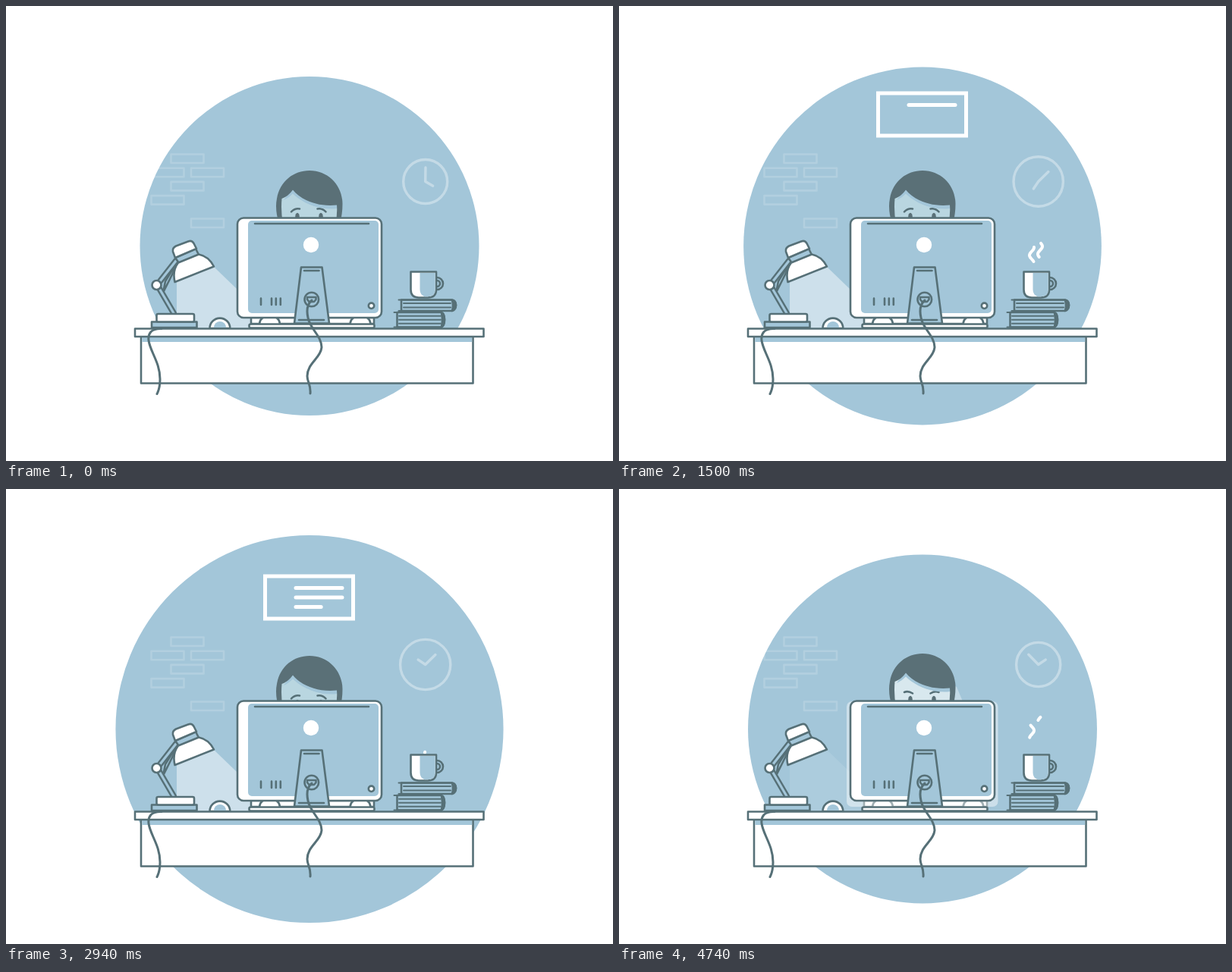
An HTML page that plays this animation: 800x600 px, repeating every 4.77 s.

```html
<!DOCTYPE html>
<html lang="en">
<head>
<meta charset="utf-8">
<title>Working at the desk</title>
<style>
  html, body { margin: 0; width: 100%; height: 100%; overflow: hidden; background: #fff; }
  svg { display: block; width: 100vw; height: 100vh; }
  .line { fill: none; stroke: #567077; stroke-width: 2.6; stroke-linecap: round; stroke-linejoin: round; }
  .white { fill: #fff; }
  .blue { fill: #a3c6d9; }
  .dark { fill: #5a7077; }
  .chalk { fill: none; stroke: #fff; stroke-linecap: round; stroke-linejoin: round; }
  .thin { stroke-width: 2; }
  .cable { stroke-width: 3; }
  .rod { stroke-width: 8; }
  .core { stroke: #a3c6d9; stroke-width: 3.2; }
</style>
</head>
<body>
<svg viewBox="0 0 800 600">
  <circle id="room" class="blue" cx="400" cy="316.5"/>
  <path id="bricks" class="chalk" stroke-width="2.6" opacity=".16"/>
  <g class="chalk" stroke-width="3.4" opacity=".36">
    <circle id="clock" cx="552.7" cy="231.5"/>
    <path id="hands"/>
  </g>

  <g id="board" class="chalk" stroke-width="5">
    <path stroke-linejoin="miter" d="M341.5 115h116v56h-116z"/>
    <path id="text"/>
    <path id="pill" stroke-width="7" d="M356 134.5h11.5"/>
    <circle id="alert" cx="474" cy="110" fill="#c1272d" stroke="none"/>
  </g>

  <path id="steam" class="chalk" stroke-width="4"/>
  <path id="beam" class="white" d="M225 364L274 344L358 425H225z"/>
  <path id="ray" class="white" d="M440 258L445 261L453 280H440z"/>

  <g id="head">
    <path fill="#b9d6e0" d="M362 244H437V300H362z"/>
    <path id="faceLight" class="white" d="M362 244H437V300H362z"/>
    <path id="brows" class="line"/>
    <g id="eyes" class="dark">
      <ellipse cx="384" cy="278" rx="2.8" ry="5.2"/>
      <ellipse cx="415" cy="278" rx="2.8" ry="5.2"/>
    </g>
    <path class="blue" d="M371 249L378 240L437 255V267C413 270 391 260 378 247.5Q373 253 366 256z"/>
    <path class="dark" d="M360 288Q354 268 357 254C361 231 379 217 400 217C425 217 443.5 237 443.5 261Q443.5 274 440 288H434Q437 275 436 262.5C412 265 390 257 378 242.5Q372 251 363.5 254Q362 270 365 288z"/>
  </g>

  <path class="line white" d="M323 411H485V419H323z"/>
  <path class="line white" d="M334 419Q335 409 347.5 409T361 419M453.5 419Q454.5 409 467 409T480.5 419"/>
  <rect id="glow" class="white" x="300" y="280" width="199.5" height="139" rx="7"/>

  <rect class="white" x="305" y="279.5" width="190" height="131.5" rx="8"/>
  <rect class="blue" x="319" y="283" width="172" height="122" rx="5"/>
  <rect class="line" x="305" y="279.5" width="190" height="131.5" rx="8"/>
  <path class="line" d="M328 287H478M336 385.5v8.5M350 385.5v8.5M355.8 385.5v8.5M361.8 385.5v8.5"/>
  <circle class="white" cx="402" cy="315" r="10.2"/>
  <circle class="line white" cx="481.5" cy="395.3" r="3.7"/>
  <rect class="line white" x="320.5" y="419.5" width="165" height="5" rx="2"/>
  <path class="line blue" d="M389 344.5H416.5L426 418.5H380z"/>
  <path class="line" d="M393 349H412.5M386 414H419"/>
  <circle class="line" cx="402.8" cy="387" r="9.3"/>
  <path class="line" d="M397 384H408.5V387L406 390H399.5L397 387z"/>

  <g class="line">
    <path d="M207 378L210 363L221 345M207 378L222 348"/>
    <path class="rod" d="M200 369L221 405M199 368L224 336"/>
    <path class="core" d="M200 369L221 405M199 368L224 336"/>
    <circle class="white" cx="198.5" cy="368" r="6"/>
    <path class="blue" d="M223 332L250 320L254 328L228 339z"/>
    <path class="white" d="M223 332L220 324Q219 319 224 316.5L240 310.5Q245 308.5 247.5 313L251 320z"/>
    <path class="white" d="M222.5 364Q219 349 227 338.5L254 327.5Q267 330 274 343.5z"/>
    <path class="blue" d="M192 416.5H251.5V424H192z"/>
    <rect class="white" x="198.5" y="406" width="49.5" height="10.5" rx="2"/>
    <path class="white" d="M268.5 425A13.4 13.4 0 0 1 295.3 425z"/>
  </g>
  <path class="blue" d="M274 424A8 8 0 0 1 290 424z"/>

  <g class="line">
    <path class="blue" d="M521 387.5H588Q593 388 593 394.5T588 402H521z"/>
    <path class="thin" d="M517.5 387.5H588M517.5 402H588M524 392H586M524 397.5H586"/>
    <path class="dark" d="M588 388Q593 390 593 394.5T588 402Q590 395 588 388z"/>
    <path class="blue" d="M515.5 404H574Q578 405 578 413.5T574 423.5H515.5z"/>
    <path class="thin" d="M511.5 404H574M511.5 423.5H574M518 408.7H573M518 413.7H573M518 418.7H573"/>
    <path class="dark" d="M574 404.5Q578 407 578 413.5T574 423Q576 414 574 404.5z"/>
    <circle class="blue" cx="568" cy="366" r="8"/>
    <circle class="blue" cx="568" cy="366" r="4"/>
    <path class="white" d="M533.5 350.5H567V374Q567 384.5 556 384.5H544Q533.5 384.5 533.5 374z"/>
  </g>
  <path class="blue" d="M545.5 352H565.7V374Q565.7 383.2 556 383.2H552Q545.5 381 545.5 374z"/>

  <path class="line white" d="M178 436H615.5V497.5H178z"/>
  <path class="blue" d="M179.3 437H614.2V443H179.3z"/>
  <path class="line white" d="M170 425.5H629.5V436H170z"/>
  <path class="line cable" d="M205 425.5C191 425 187 432 188 441C190 456 203 470 203 492Q203 504 199 511.5"/>
  <path class="line cable" d="M403 388C396 394 396 402 398 411C400 425 416 435 416 450C415 464 397 471 397 488C397 496 402 499 401 511"/>
</svg>

<script>
const LOOP = 4770;
const STEAM_LOOP = 2850;
const el = {};
for (const node of document.querySelectorAll("[id]")) el[node.id] = node;

const set = (id, name, value) => el[id].setAttribute(name, value);
const ramp = (t, start, length) => Math.min(1, Math.max(0, (t - start) / length));
const easeOut = p => 1 - (1 - p) ** 2;
// Smooth bump around a centre time.
const pulse = (t, center, reach) => (1 + Math.cos(Math.PI * ramp(Math.abs(t - center), 0, reach))) / 2;
// Fades in from start and out towards end.
const plateau = (t, start, end, fade) => Math.min(ramp(t, start, fade), ramp(end - t, 0, fade));

// Brick positions as x and row.
set("bricks", "d", [[217.5, 0], [191.5, 1], [244, 1], [217.5, 2], [191.5, 3], [244, 4.67]]
  .map(([x, row]) => `M${x} ${195.5 + 18.2 * row}h43v11.5h-43z`).join(""));

function hand(degrees, length) {
  const a = degrees * Math.PI / 180;
  return `${552.7 + length * Math.sin(a)} ${231.5 - length * Math.cos(a)}`;
}

function drawRoom(t) {
  const peak = 2860;
  set("room", "r", t < peak ? 223.5 + 33.2 * (t / peak) ** 1.53 : 256.7 - 0.0142 * (t - peak));
  set("clock", "r", 29 + 4.4 * Math.sin(Math.PI * t / LOOP));
  set("hands", "d", `M${hand(t * 0.75, 18.5)}L552.7 231.5L${hand(120 + t / 16, 11.5)}`);
  const dim = ramp(t, 4560, 180);
  set("beam", "opacity", 0.45 - 0.35 * dim);
  set("ray", "opacity", 0.35 * dim);
}

function drawBoard(t) {
  const slide = -300 * (1 - easeOut(ramp(t, 600, 522)));
  const tilt = 1.5 * Math.sin(3 * Math.PI * ramp(t, 4080, 360));
  const size = ramp(t, 500, 100) - ramp(t, 4450, 200);
  set("board", "transform", `translate(${399.5 + slide} 143) rotate(${tilt}) scale(${size}) translate(-399.5 -143)`);
  let lines = "";
  for (let i = 0; i < 3; i++) {
    const typed = ramp(t, 825 + 956 * i, 375);
    if (typed) lines += `M382 ${130.5 + 12.5 * i}h${61 * typed}`;
  }
  set("text", "d", lines);
  set("pill", "opacity", t > 3900 ? 1 : 0);
  set("alert", "r", 5.2 * ramp(t, 4100, 130));
}

// A wave that grows from the cup, rests, then leaves from its lower end.
function wisp(u, x, crest, rise, duration, leave) {
  const gone = ramp(u, leave, 600);
  const top = 350 - 35 * easeOut(ramp(u, rise, duration)) - 18 * gone;
  const bottom = 350 - 13 * easeOut(ramp(u, rise, duration * 0.65)) - 40 * gone;
  if (bottom - top < 0.3) return "";
  const points = [];
  for (let y = bottom; y > top; y--) {
    points.push(`${x + 3 * Math.cos((y - crest) / 10.3 * Math.PI)} ${y}`);
  }
  return `M${points.join("L")}l0 0`;
}

function drawSteam(t) {
  const u = t % STEAM_LOOP;
  set("steam", "d", wisp(u, 544, 339, 480, 1400, 1750) + wisp(u, 555, 337.5, 30, 1050, 1410));
}

function drawPerson(t) {
  const glow = plateau(t, 980, 1400, 130) + plateau(t, 4060, 4820, 180);
  set("glow", "opacity", glow);
  set("faceLight", "opacity", glow);

  const duck = pulse(t, 2940, 400);
  const peek = pulse(t, 3510, 400);
  const surprise = pulse(t, 4260, 300);
  const frown = ramp(t, 4450, 200);
  set("head", "transform", `translate(0 ${3 * duck - 7 * peek - 1.5 * pulse(t, 1080, 400)})`);
  set("eyes", "transform", `translate(${2.6 * peek} ${2 * duck})`);
  const lift = 2 * duck - 7 * surprise;
  const outer = 271.3 + lift - 3.3 * frown;
  const middle = 266.3 + lift - 0.5 * frown;
  const inner = 267.5 + lift + 2 * frown;
  set("brows", "d", `M376 ${outer}Q381 ${middle} 387 ${inner}M421.5 ${outer}Q416.5 ${middle} 410.5 ${inner}`);
}

function draw() {
  const t = performance.now() % LOOP;
  drawRoom(t);
  drawBoard(t);
  drawSteam(t);
  drawPerson(t);
  requestAnimationFrame(draw);
}
draw();
</script>
</body>
</html>
```
